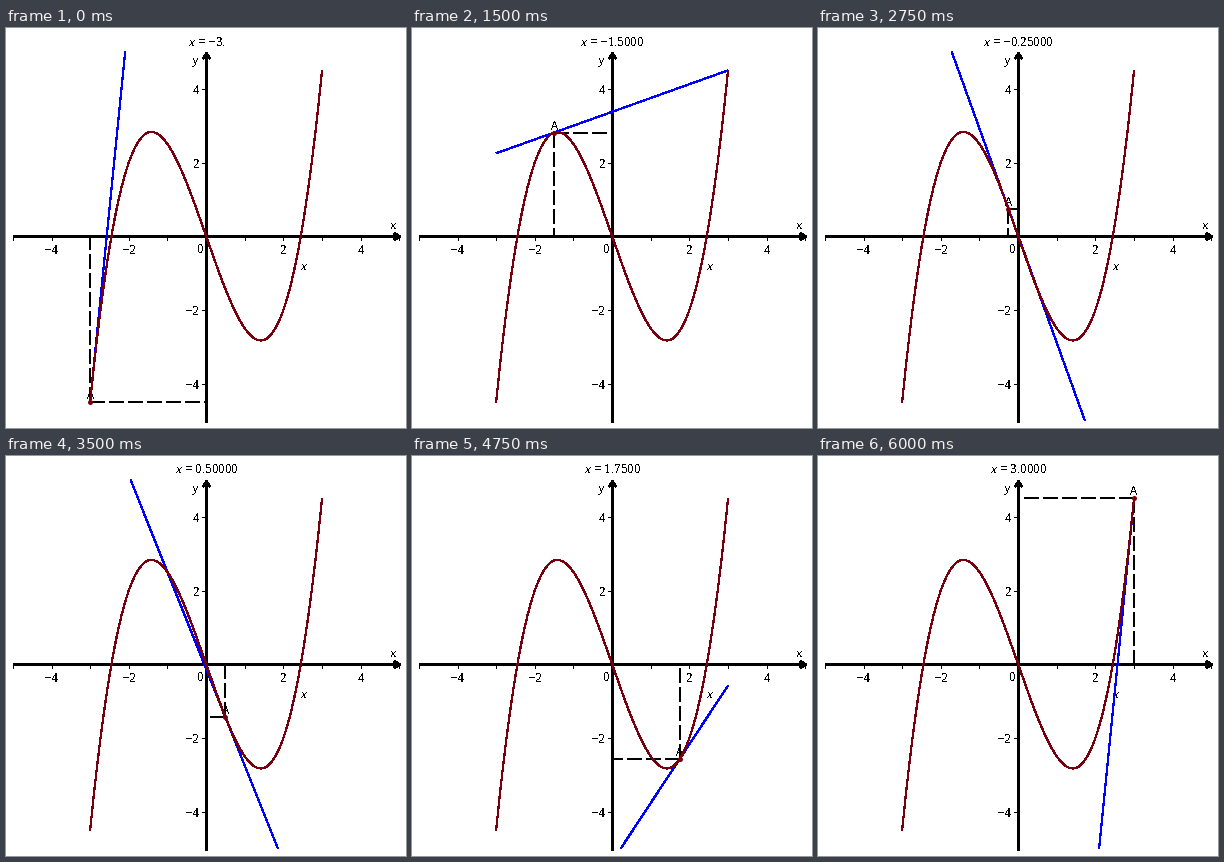
These frames come from a looping animation (400 px wide and 400 px high, 6.25 s). A matplotlib script:

```python
import numpy as np
import matplotlib.pyplot as plt
from matplotlib.animation import FuncAnimation

plt.rcParams.update({
    "font.family": "Liberation Serif",
    "mathtext.fontset": "custom",
    "mathtext.rm": "Liberation Serif",
    "mathtext.it": "Liberation Serif:italic",
    "text.antialiased": False,
    "text.hinting": "native",
    "lines.antialiased": False,
    "lines.solid_capstyle": "butt",
    "lines.solid_joinstyle": "miter",
    "toolbar": "None",
})

SIZE, DPI = 400, 100
PX = 72 / DPI                     # points per pixel
X0, Y0, SX, SY = 200.1, 208.2, 38.65, 36.85
FRAMES, STEP_MS = 25, 250
MAROON, BLUE = "#78000e", "#0000ff"

fig = plt.figure(figsize=(SIZE / DPI, SIZE / DPI), dpi=DPI, facecolor="white")
ax = fig.add_axes([0, 0, 1, 1])
ax.set(xlim=(0, SIZE), ylim=(SIZE, 0))
ax.axis("off")


def f(x):
    return x ** 3 / 2 - 3 * x


def slope(x):
    return 1.5 * x ** 2 - 3


def to_px(x, y):
    return X0 + SX * np.asarray(x), Y0 - SY * np.asarray(y)


def line(xs, ys, width, color="black", z=3, **kw):
    return ax.plot(xs, ys, lw=width * PX, color=color, zorder=z, **kw)[0]


def label(x, y, s, ha="center", z=3, **kw):
    return ax.text(x, y, s, size=13 * PX, ha=ha, va="baseline", zorder=z, **kw)


def number(v):
    return str(v).replace("-", "\u2212")


# Axes with open arrow heads
line([7, 394], [Y0, Y0], 3)
line([X0, X0], [25, 394], 3)
line([388, 394, 388], [Y0 - 3, Y0 + 0.3, Y0 + 3.6], 1.5)
line([X0 - 3, X0 + 0.4, X0 + 3.8], [31, 25, 31], 1.5)

for k in range(-5, 6, 2):
    x = to_px(k, 0)[0]
    line([x, x], [Y0, 212], 1)
for k in (-4, -2, 2, 4):
    x, y = to_px(k, k)
    line([x, x], [Y0, 212], 1)
    line([196, X0], [y, y], 1)
    label(x, 226, number(k))
    label(193.5, y + 5, number(k), ha="right")
label(195, 225, "0")
label(387, 201, "x")
label(189.5, 36, "y")
label(298, 242, "x", style="italic")

xs = np.linspace(-3, 3, 200)
line(*to_px(xs, f(xs)), 1.2, MAROON, z=6)

dash = dict(linestyle=(0, (7, 2.5)), dash_capstyle="butt")
drop = line([], [], 2, z=2, **dash)
across = line([], [], 2, z=2, **dash)
tangent = line([], [], 1.2, BLUE, z=5)
dot, = ax.plot([], [], "o", ms=5 * PX, color=MAROON, mew=0, zorder=4)
name = label(0, 0, "A", z=2)
title = label(X0 + 0.4, 18, "")


def title_text(i, a):
    if i == 0 or a == 0:
        value = f"{a:.0f}."
    else:
        value = f"{a:.{5 if abs(a) < 1 else 4}f}"
    return f"$\\mathit{{x}}$ = {number(value)}"


def draw(i):
    a = -3 + i / 4
    b, m = f(a), slope(a)
    px, py = to_px(a, b)

    # Tangent kept inside |x| <= 3, |y| <= 5
    ends = sorted(((-5 - b) / m + a, (5 - b) / m + a))
    tx = np.clip(ends, -3, 3)
    tangent.set_data(*to_px(tx, b + m * (tx - a)))

    drop.set_data([px, px], [py, Y0])
    across.set_data([px, X0], [py, py])
    dot.set_data([px], [py])
    name.set_position((px, py - 3))
    title.set_text(title_text(i, a))
    title.set_y(18 if a < 0 else 17)
    return tangent, drop, across, dot, name, title


anim = FuncAnimation(fig, draw, frames=FRAMES, interval=STEP_MS,
                     init_func=lambda: draw(0), repeat=True, repeat_delay=0)
plt.show()
```
